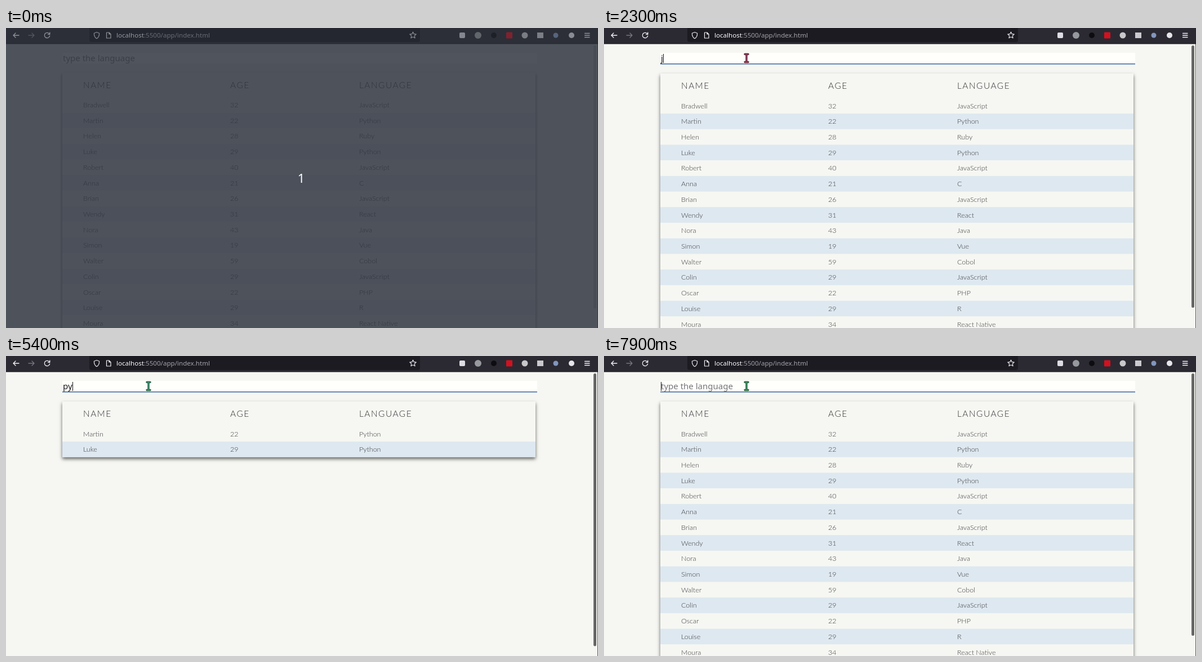
These frames come from a looping animation (1051 by 533 pixels, 8 s). An HTML page with a canvas:

```html
<!DOCTYPE html>
<html lang="en">
<head>
<meta charset="utf-8">
<title>Filter a table by language</title>
<style>
  html, body { margin: 0; width: 100%; height: 100%; overflow: hidden; background: #f6f7f2; }
  canvas { display: block; width: 1051px; height: 533px; }
</style>
</head>
<body>
<canvas id="stage" width="1051" height="533"></canvas>
<script>
const W = 1051, H = 533, LOOP = 8000, STEP = 100;
const FOCUS_AT = 1400, FADE = 500, BLINK = 600;
const ROW_H = 27.72;
const COLUMNS = [137, 398, 627];
const UI_FONT = '"Noto Sans", "Open Sans", sans-serif';
const INPUT_FONT = '15px ' + UI_FONT;
const TABLE_FONT = 'Lato, "Open Sans", sans-serif';
const ctx = document.getElementById('stage').getContext('2d');

const people = [
  ['Bradwell', 32, 'JavaScript'], ['Martin', 22, 'Python'], ['Helen', 28, 'Ruby'],
  ['Luke', 29, 'Python'], ['Robert', 40, 'JavaScript'], ['Anna', 21, 'C'],
  ['Brian', 26, 'JavaScript'], ['Wendy', 31, 'React'], ['Nora', 43, 'Java'],
  ['Simon', 19, 'Vue'], ['Walter', 59, 'Cobol'], ['Colin', 29, 'JavaScript'],
  ['Oscar', 22, 'PHP'], ['Louise', 29, 'R'], ['Moura', 34, 'React Native']
];

// [time, content of the search field]
const edits = [
  [FOCUS_AT, ''], [2300, 'j'], [2500, 'ja'], [2700, 'jav'], [2900, 'java'],
  [4100, 'jav'], [4200, ''], [5100, 'p'], [5300, 'py'], [5500, 'pyt'],
  [5800, 'pyth'], [6100, 'pytho'], [6400, 'python'], [7100, 'pytho'],
  [7600, 'pyth'], [7700, 'py'], [7800, '']
];

function editAt(t) {
  let last = [0, ''];
  for (const e of edits) if (e[0] <= t) last = e;
  return last;
}

function rect(x, y, w, h, color) {
  ctx.fillStyle = color;
  ctx.fillRect(x, y, w, h);
}

function round(x, y, w, h, r, color) {
  ctx.fillStyle = color;
  ctx.beginPath();
  ctx.roundRect(x, y, w, h, r);
  ctx.fill();
}

function dot(x, y, r, color) {
  ctx.fillStyle = color;
  ctx.beginPath();
  ctx.arc(x, y, r, 0, Math.PI * 2);
  ctx.fill();
}

function text(str, x, y, font, color, spacing = 0) {
  ctx.font = font;
  ctx.letterSpacing = spacing + 'px';
  ctx.fillStyle = color;
  ctx.fillText(str, x, y);
  ctx.letterSpacing = '0px';
}

function stroke(path, color, width = 1.3) {
  ctx.strokeStyle = color;
  ctx.lineWidth = width;
  ctx.stroke(new Path2D(path));
}

function starPath(cx, cy, r) {
  let d = '';
  for (let i = 0; i < 10; i++) {
    const a = -Math.PI / 2 + i * Math.PI / 5, k = i % 2 ? r * 0.48 : r;
    d += (i ? 'L' : 'M') + (cx + k * Math.cos(a)) + ' ' + (cy + k * Math.sin(a));
  }
  return d + 'Z';
}

function drawToolbar() {
  const light = '#f4f4f8';
  rect(0, 0, W, 28, '#2b2a33');
  rect(0, 27.5, W, 1, '#111116');
  round(148, -4, 587, 29, 4, '#1c1b22');

  ctx.lineCap = ctx.lineJoin = 'round';
  stroke('M23 13H13M17 9L13 13L17 17', light);
  stroke('M40 13H50M46 9L50 13L46 17', '#77767e');
  stroke('M77 10.5A4.7 4.7 0 1 0 77.6 14M77.8 8V11.3H74.5', light);
  stroke('M161 7.5L165.6 9.2C165.8 14 164 17 161 18.7C158 17 156.2 14 156.4 9.2Z', '#e4e4ea', 1.2);
  stroke('M178.5 8H183L186 11V18H178.5ZM183 8V11H186', light, 1.2);
  stroke(starPath(722.5, 13, 6), light, 1.1);

  const font = '11.6px ' + UI_FONT;
  text('localhost', 196, 17, font, '#fbfbfe');
  const x = 196 + ctx.measureText('localhost').width;
  text(':5500/app/index.html', x, 17, font, '#a3a2a9');

  round(805, 8, 10, 10, 2, '#dcdce2');
  dot(838, 13, 6, '#96999e');
  dot(866, 13, 5, '#0d0d10');
  round(888, 7.5, 11, 11, 1, '#d5101f');
  dot(921, 13, 5.5, '#c8c8ca');
  rect(943, 8, 11, 10, '#c9c9ce');
  dot(976, 13, 4.5, '#8296bd');
  dot(1004, 13, 5, '#e6e6ea');
  stroke('M1027.5 9.5H1036M1027.5 13H1036M1027.5 16.5H1036', light);
}

function drawInput(t, focused) {
  const [since, value] = editAt(t);
  rect(100, 44, 843, 19, '#fffffc');
  if (focused) rect(100, 63, 843, 1.6, '#416fa9');
  text(value || 'type the language', 101, 59, INPUT_FONT, value ? '#17171a' : '#75757a');
  if (focused && Math.floor((t - since) / BLINK) % 2 === 0) {
    const x = Math.round(101 + (value ? ctx.measureText(value).width : 0));
    rect(x, 46, 1, 16, '#111');
  }
}

function drawTable(rows, top) {
  const first = top + 43.6;
  const height = 43.6 + rows.length * ROW_H;
  ctx.save();
  ctx.shadowColor = 'rgba(0,0,0,.6)';
  ctx.shadowBlur = 6;
  ctx.shadowOffsetY = 3;
  rect(100, top, 840, height, '#f6f7f2');
  ctx.restore();

  ['NAME', 'AGE', 'LANGUAGE'].forEach((label, i) =>
    text(label, COLUMNS[i], top + 27.5, '300 15.4px ' + TABLE_FONT, '#2e2e30', 1.54));

  rows.forEach((row, n) => {
    const y = first + n * ROW_H;
    if (n % 2) rect(100, y, 840, ROW_H, '#dee8f0');
    row.forEach((cell, i) =>
      text(String(cell), COLUMNS[i], y + 18.3, '300 12.5px ' + TABLE_FONT, '#39393c'));
  });
}

// The pointer's hue runs backwards round the colour wheel.
function drawPointer(t) {
  const turn = 0.99 - (t - 1000) / 1235;
  const hue = 360 * (turn - Math.floor(turn));
  const beam = 'M250 46.5H256M250 60.5H256M253 46.5V60.5';
  ctx.lineCap = 'round';
  stroke(beam, `hsl(${hue} 38% 24%)`, 3.4);
  stroke(beam, `hsl(${hue} 40% 40%)`, 1.6);
}

function drawCountdown(t) {
  const k = 1 - t / FADE;
  if (k <= 0) return;
  rect(0, 0, W, 28, `rgba(47,52,63,${0.5 * k})`);
  rect(0, 28, W, H - 28, `rgba(47,52,63,${0.84 * k})`);
  ctx.textAlign = 'center';
  text('1', 524, 275, '22px ' + UI_FONT, `rgba(255,255,255,${k})`);
  ctx.textAlign = 'left';
}

function draw(t) {
  const focused = t >= FOCUS_AT;
  // The table follows the field one step later.
  const query = editAt(t - STEP)[1];
  const rows = people.filter(p => p[2].toLowerCase().includes(query));
  const thumbEnd = rows.length < people.length ? 515.5 : focused ? 497 : 498.5;

  rect(0, 0, W, H, '#f6f7f2');
  drawTable(rows, focused ? 80.6 : 79);
  drawInput(t, focused);
  round(1043, 31, 5, thumbEnd - 31, 2.5, focused ? '#676767' : '#cdcdcb');
  rect(1050, 28, 1, H - 28, '#5a5961');
  drawToolbar();
  if (t >= FADE) drawPointer(t);
  drawCountdown(t);
}

const start = performance.now();
function tick() {
  const t = (performance.now() - start) % LOOP;
  draw(Math.floor(t / STEP) * STEP);
  requestAnimationFrame(tick);
}
tick();
</script>
</body>
</html>
```
